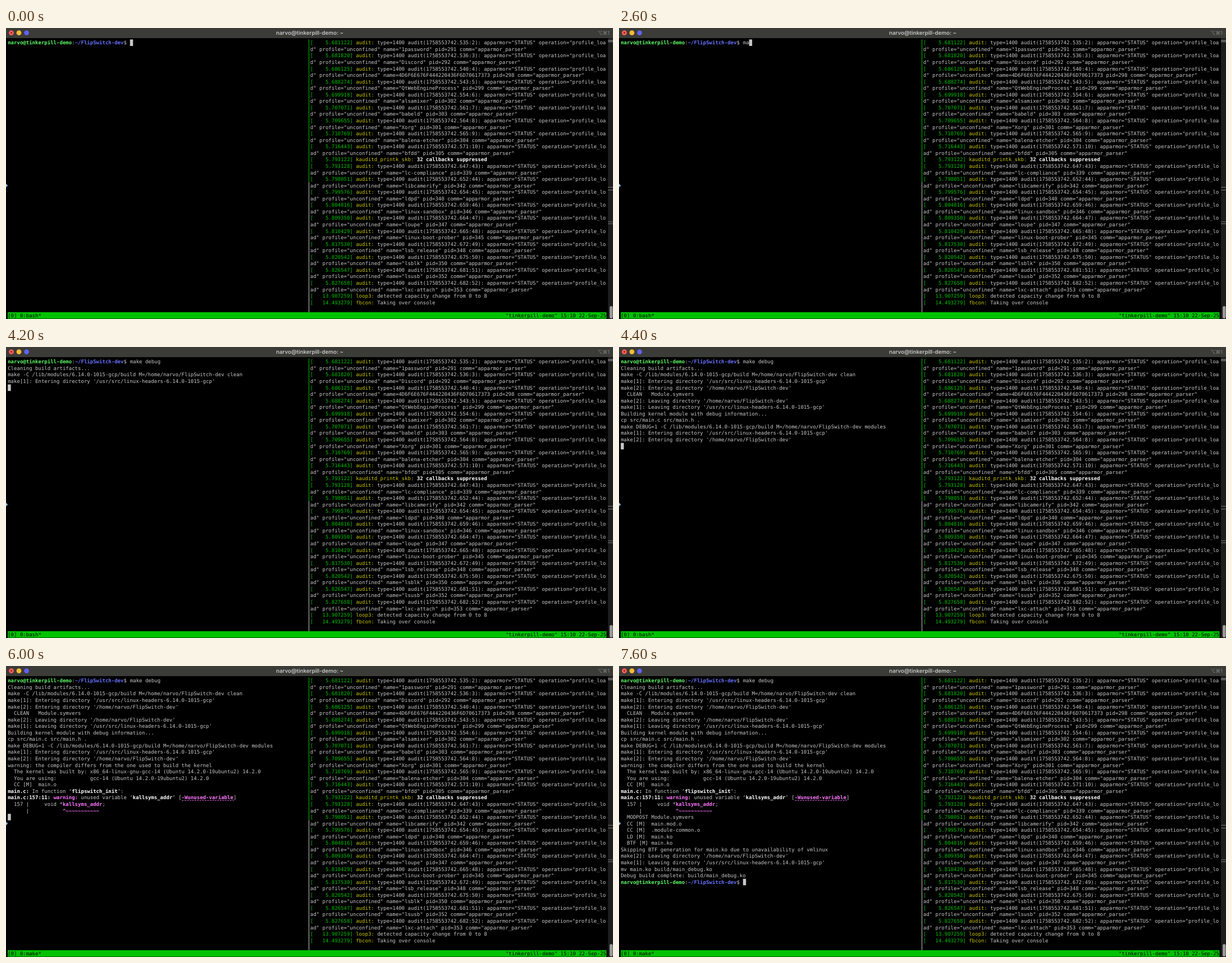
An HTML page for the animation above (8000 ms loop, 1081 px wide and 518 px high).

```html
<!DOCTYPE html>
<html lang="en">
<head>
<meta charset="utf-8">
<title>Kernel module build</title>
<style>
  html, body { margin: 0; width: 100%; height: 100%; overflow: hidden; background: #000; }
  svg { display: block; width: 1081px; height: 518px; }
  text { white-space: pre; text-rendering: geometricPrecision; }
  .term text { font: 9.036px "DejaVu Sans Mono", "Liberation Mono", monospace; fill: #c7c7c7; }
  .term .k { fill: #000; }
  .g { fill: #00c200; }
  .y { fill: #c7c400; }
  .u { fill: #5ffa68; font-weight: bold; }
  .p { fill: #6871ff; font-weight: bold; }
  .m { fill: #ff77ff; font-weight: bold; }
  .b { fill: #fff; font-weight: bold; }
  .title { font: 600 9.7px Inter, "Open Sans", sans-serif; fill: #c6c6c4; text-anchor: middle; }
  .keys { font: 9px Inter, "DejaVu Sans", sans-serif; fill: #858583; text-anchor: end; }
</style>
</head>
<body>
<svg viewBox="0 0 1081 518" xml:space="preserve">
  <rect width="1081" height="518"/>
  <rect width="1081" height="18" fill="#3b3b38"/>
  <circle cx="9.5" cy="8.6" r="4.4" fill="#ff5f57"/>
  <circle cx="9.5" cy="8.6" r="1.4" fill="#7a1712"/>
  <circle cx="23" cy="8.6" r="4.4" fill="#f5bb35"/>
  <circle cx="36.6" cy="8.6" r="4.4" fill="#6262ee"/>
  <text class="title" x="541" y="12">narvo@tinkerpill-demo: ~</text>
  <text class="keys" x="1075" y="11.5">⌥⌘1</text>

  <g class="scrollbar">
    <rect x="1072" y="18" width="9" height="500" fill="#1d1d1d"/>
    <rect x="1072" y="21" width="9" height="4.5" fill="#5c5c5c"/>
    <path d="M1072 283.5h9m-9 5h9m-9 56.5h9m-9 3.5h9" stroke="#777"/>
    <rect x="1075" y="495" width="5.5" height="22" rx="2.7" fill="#9c9c9c"/>
  </g>
  <path d="M0 277l3.4 3.4l-3.4 3.4z" fill="#7db9e8"/>

  <path d="M539.5 20.4V274.7" stroke="#00c200"/>
  <path d="M539.5 274.7V505.9" stroke="#c7c7c7"/>
  <rect x="3.2" y="505.9" width="1066.2" height="11.6" fill="#00c200"/>

  <g class="term" id="term"></g>
  <rect id="caret" width="5.44" height="11.56" fill="#c7c7c7"/>
  <g id="mouse" fill="none" stroke-linecap="round">
    <path id="beam" d="M-2.4 -5Q0 -5 0 -3.4V3.4Q0 5 -2.4 5M2.4 -5Q0 -5 0 -3.4M0 3.4Q0 5 2.4 5M-1.2 1.5H1.2" stroke="#e8e8e8" stroke-width="2.2"/>
    <use href="#beam"/>
    <path d="M-2.4 -5Q0 -5 0 -3.4V3.4Q0 5 -2.4 5M2.4 -5Q0 -5 0 -3.4M0 3.4Q0 5 2.4 5" stroke="#222" stroke-width=".8"/>
  </g>
</svg>
<script>
const LOOP = 8000, LEFT = 3.2, TOP = 20.4, CELL_W = 5.44, CELL_H = 11.56;
const RIGHT_COL = 99, PANE_COLS = 97, STATUS_ROW = 42;
const $ = id => document.getElementById(id);
const colX = c => LEFT + c * CELL_W;
const rowY = r => TOP + r * CELL_H;

// "{c text}" gives the text class c
const markup = s => s.replace(/\{(\w) (.*?)\}/g, '<tspan class="$1">$2</tspan>');
function addText(row, col, s, cls = '') {
  $('term').insertAdjacentHTML('beforeend',
    `<text class="${cls}" x="${colX(col)}" y="${rowY(row) + 8.9}">${markup(s)}</text>`);
  return $('term').lastElementChild;
}

// Kernel log
const audits = `5.681122 535:2 "1password" 291
5.681820 536:3 "Discord" 292
5.686125 540:4 4D6F6E676F444220436F6D70617373 298
5.688274 543:5 "QtWebEngineProcess" 299
5.699918 554:6 "alsamixer" 302
5.707071 561:7 "babeld" 303
5.709655 564:8 "Xorg" 301
5.710769 565:9 "balena-etcher" 304
5.716443 571:10 "bfdd" 305
5.793128 647:43 "lc-compliance" 339
5.798051 652:44 "libcamerify" 342
5.799576 654:45 "ldpd" 340
5.804816 659:46 "linux-sandbox" 346
5.809350 664:47 "loupe" 347
5.810429 665:48 "linux-boot-prober" 345
5.817530 672:49 "lsb_release" 348
5.820542 675:50 "lsblk" 350
5.826547 681:51 "lsusb" 352
5.827658 682:52 "lxc-attach" 353`.split('\n').map(l => l.split(' '));

let logRow = 0;
function log(stamp, source, message) {
  const stampText = `[${stamp.padStart(12)}]`;
  const room = PANE_COLS - stampText.length - source.length - 3;
  const wraps = !message.startsWith('{') && message.length > room;
  const first = wraps ? message.slice(0, room) : message;
  addText(logRow++, RIGHT_COL, `{g ${stampText}} {y ${source}:} ${first}`);
  if (wraps) addText(logRow++, RIGHT_COL, message.slice(room));
}
audits.forEach(([stamp, serial, name, pid], i) => {
  if (i === 9) log('5.793122', 'kauditd_printk_skb', '{b 32 callbacks suppressed}');
  log(stamp, 'audit', `type=1400 audit(1758553742.${serial}): apparmor="STATUS" ` +
    `operation="profile_load" profile="unconfined" name=${name} pid=${pid} comm="apparmor_parser"`);
});
log('13.907259', 'loop3', 'detected capacity change from 0 to 8');
log('14.493279', 'fbcon', 'Taking over console');

// Build session
const prompt = '{u narvo@tinkerpill-demo}:{p ~/FlipSwitch-dev}$ ';
const promptLen = 40;
const command = 'make debug';
const home = '/home/narvo/FlipSwitch-dev';
const kernel = '6.14.0-1015-gcp';
const dir = (level, verb) =>
  `make[${level}]: ${verb} directory '${level === 1 ? '/usr/src/linux-headers-' + kernel : home}'`;

const output = [
  'Cleaning build artifacts...',
  `make -C /lib/modules/${kernel}/build M=${home} clean`,
  dir(1, 'Entering'),
  dir(2, 'Entering'),
  '  CLEAN   Module.symvers',
  dir(2, 'Leaving'),
  dir(1, 'Leaving'),
  'Building kernel module with debug information...',
  'cp src/main.c src/main.h .',
  `make DEBUG=1 -C /lib/modules/${kernel}/build M=${home} modules`,
  dir(1, 'Entering'),
  dir(2, 'Entering'),
  'warning: the compiler differs from the one used to build the kernel',
  '  The kernel was built by: x86_64-linux-gnu-gcc-14 (Ubuntu 14.2.0-19ubuntu2) 14.2.0',
  '  You are using:           gcc-14 (Ubuntu 14.2.0-19ubuntu2) 14.2.0',
  '  CC [M]  main.o',
  '{b main.c:} In function ‘{b flipswitch_init}’:',
  '{b main.c:157:11:} {m warning:} unused variable ‘{b kallsyms_addr}’ [{m -Wunused-variable}]',
  '  157 |     void *{m kallsyms_addr};',
  '      |           {m ^~~~~~~~~~~~}',
  '  MODPOST Module.symvers',
  '  CC [M]  main.mod.o',
  '  CC [M]  .module-common.o',
  '  LD [M]  main.ko',
  '  BTF [M] main.ko',
  'Skipping BTF generation for main.ko due to unavailability of vmlinux',
  dir(2, 'Leaving'),
  dir(1, 'Leaving'),
  'mv main.ko build/main_debug.ko',
  'Debug build complete: build/main_debug.ko',
  prompt
];
addText(0, 0, prompt);
const typed = addText(0, promptLen, '');
const lines = output.map((s, i) => addText(i + 1, 0, s));

// Dashed underline of the compiler flag link
const linkRow = 18, linkCol = 57;
$('term').insertAdjacentHTML('beforeend',
  `<path d="M${colX(linkCol)} ${rowY(linkRow) + 10.8}h${17 * CELL_W}" stroke="#ff77ff" stroke-width=".9" stroke-dasharray="3 1.5"/>`);
const underline = $('term').lastElementChild;

const job = addText(STATUS_ROW, 0, '', 'k');
addText(STATUS_ROW, 163, '"tinkerpill-demo" 15:10 22-Sep-25', 'k');

// [time, value] steps, each held until the next
const typing = [[0, 0], [2400, 1], [2600, 2], [2800, 3], [3000, 5], [3400, 6], [3600, 7], [3800, 10]];
const printing = [[0, 0], [4200, 3], [4400, 12], [5000, 15], [5200, 16], [6000, 20],
  [6200, 21], [6400, 22], [6800, 23], [7200, output.length]];
const pointer = [[0, null], [800, [262.5, 121]], [1000, [266, 103]], [1200, [266, 101.3]], [2400, null]];
const jobs = [[0, 'bash'], [5000, 'make']];
const at = (steps, t) => steps.findLast(([start]) => start <= t)[1];
const show = (el, on) => el.setAttribute('visibility', on ? 'visible' : 'hidden');

function draw() {
  const t = performance.now() % LOOP;
  const chars = at(typing, t), shown = at(printing, t), spot = at(pointer, t);
  typed.textContent = command.slice(0, chars);
  lines.forEach((line, i) => show(line, i < shown));
  show(underline, shown >= linkRow);
  job.textContent = `[0] 0:${at(jobs, t)}*`;

  const done = shown === output.length;
  const caretCol = done ? promptLen : shown ? 0 : promptLen + chars;
  const caretRow = done ? shown : shown && shown + 1;
  $('caret').setAttribute('x', colX(caretCol));
  $('caret').setAttribute('y', rowY(caretRow));

  show($('mouse'), spot);
  if (spot) $('mouse').setAttribute('transform', `translate(${spot})`);
  requestAnimationFrame(draw);
}
draw();
</script>
</body>
</html>
```
